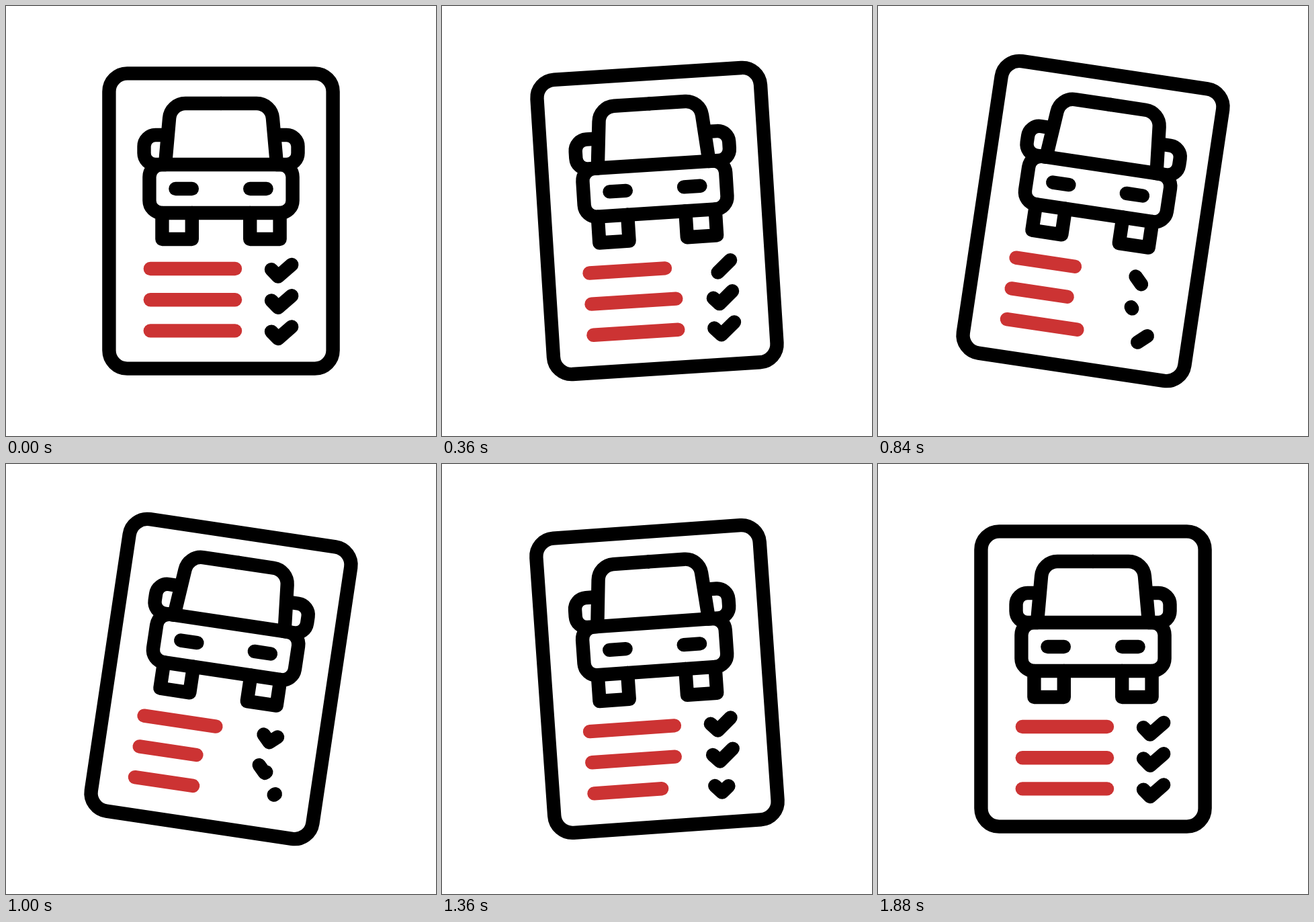
An HTML page with a canvas that plays this animation: 640x640 px, repeating every 1.96 s.

```html
<!DOCTYPE html>
<html lang="en">
<head>
<meta charset="utf-8">
<title>Vehicle checklist</title>
<style>
  html, body { margin: 0; width: 100%; height: 100%; overflow: hidden; background: #fff; }
  canvas { display: block; width: 100vmin; height: 100vmin; }
</style>
</head>
<body>
<canvas id="stage" width="640" height="640"></canvas>
<script>
const ctx = document.getElementById('stage').getContext('2d');
const LOOP = 1960, STEP = 40;
const INK = '#000', RED = '#cc3333';
const ROW = 46.2, SHORT = 0.665;

// Times in ms: when each row's line and tick shrink, then grow back.
const rows = [
  { line: [190, 640, 745, 1210], tick: [190, 650, 675, 1140] },
  { line: [350, 800, 940, 1430], tick: [337, 805, 810, 1270] },
  { line: [610, 1080, 1160, 1620], tick: [582, 1028, 1050, 1510] }
];

// Tilt: start, end, from, to (degrees).
const tilts = [
  [50, 430, 0, -4],
  [532, 882, -4, 9],
  [958, 1308, 9, -4],
  [1385, 1810, -4, 0]
];

const ramp = (t, a, b) => Math.min(1, Math.max(0, (t - a) / (b - a)));
const ease = u => u * u * (3 - 2 * u);

function tiltAt(t) {
  return tilts.reduce((sum, [a, b, from, to]) => sum + (to - from) * ease(ramp(t, a, b)), 0);
}

function stroke(draw, color = INK) {
  ctx.strokeStyle = color;
  ctx.beginPath();
  draw();
  ctx.stroke();
}

function segment(x1, x2, y, color) {
  stroke(() => { ctx.moveTo(x1, y); ctx.lineTo(x2, y); }, color);
}

// Strokes the part of a polyline between two fractions of its length.
function trimmed(points, from, to) {
  const lens = points.slice(1).map((p, i) => Math.hypot(p[0] - points[i][0], p[1] - points[i][1]));
  const total = lens.reduce((a, b) => a + b, 0);
  const start = from * total, end = to * total;
  if (end - start < 0.01) return;
  stroke(() => {
    let at = 0, open = false;
    lens.forEach((len, i) => {
      const a = Math.max(start, at), b = Math.min(end, at + len);
      if (b > a) {
        const [x0, y0] = points[i], [x1, y1] = points[i + 1];
        const place = d => [x0 + (x1 - x0) * (d - at) / len, y0 + (y1 - y0) * (d - at) / len];
        if (!open) ctx.moveTo(...place(a));
        ctx.lineTo(...place(b));
        open = true;
      }
      at += len;
    });
  });
}

// Half of the car; the other half is its mirror image.
function carSide() {
  stroke(() => {
    ctx.moveTo(320, 145);
    ctx.arcTo(245, 145, 243, 168, 24);
    ctx.lineTo(237.3, 232);
  });
  stroke(() => {
    ctx.moveTo(238, 192);
    ctx.arcTo(205.5, 192, 205.5, 214, 17);
    ctx.arcTo(205.5, 236, 238, 236, 17);
    ctx.lineTo(238, 236);
  });
  stroke(() => {
    ctx.moveTo(232.4, 308);
    ctx.lineTo(232.4, 347);
    ctx.lineTo(276.8, 347);
    ctx.lineTo(276.8, 308);
  });
  segment(252.4, 276.8, 272, INK);
}

function car() {
  carSide();
  ctx.save();
  ctx.translate(640, 0);
  ctx.scale(-1, 1);
  carSide();
  ctx.restore();
  stroke(() => ctx.roundRect(213.4, 236, 213.2, 72, 18.5));
}

function row({ line, tick }, y, t) {
  const [a, b, c, d] = line;
  const shrink = ease(ramp(t, a, b)) - ease(ramp(t, c, d));
  segment(214.8, 214.8 + 126.2 * (1 - (1 - SHORT) * shrink), y, RED);

  const mark = [[395, y + 1.2], [405, y + 11.6], [425.2, y - 6]];
  if (t < tick[2]) trimmed(mark, ramp(t, tick[0], tick[1]), 1);
  else trimmed(mark, 0, ramp(t, tick[2], tick[3]));
}

function render(t) {
  ctx.fillStyle = '#fff';
  ctx.fillRect(0, 0, 640, 640);
  ctx.save();
  ctx.translate(320, 320);
  ctx.rotate(tiltAt(t) * Math.PI / 180);
  ctx.translate(-320, -320);
  ctx.lineWidth = 20.4;
  ctx.lineCap = ctx.lineJoin = 'round';
  stroke(() => ctx.roundRect(153.4, 100.4, 333.2, 439.2, 27));
  car();
  rows.forEach((r, i) => row(r, 391 + i * ROW, t));
  ctx.restore();
}

const begin = performance.now();
function tick() {
  const t = (performance.now() - begin) % LOOP;
  render(Math.floor(t / STEP) * STEP);
  requestAnimationFrame(tick);
}
tick();
</script>
</body>
</html>
```
